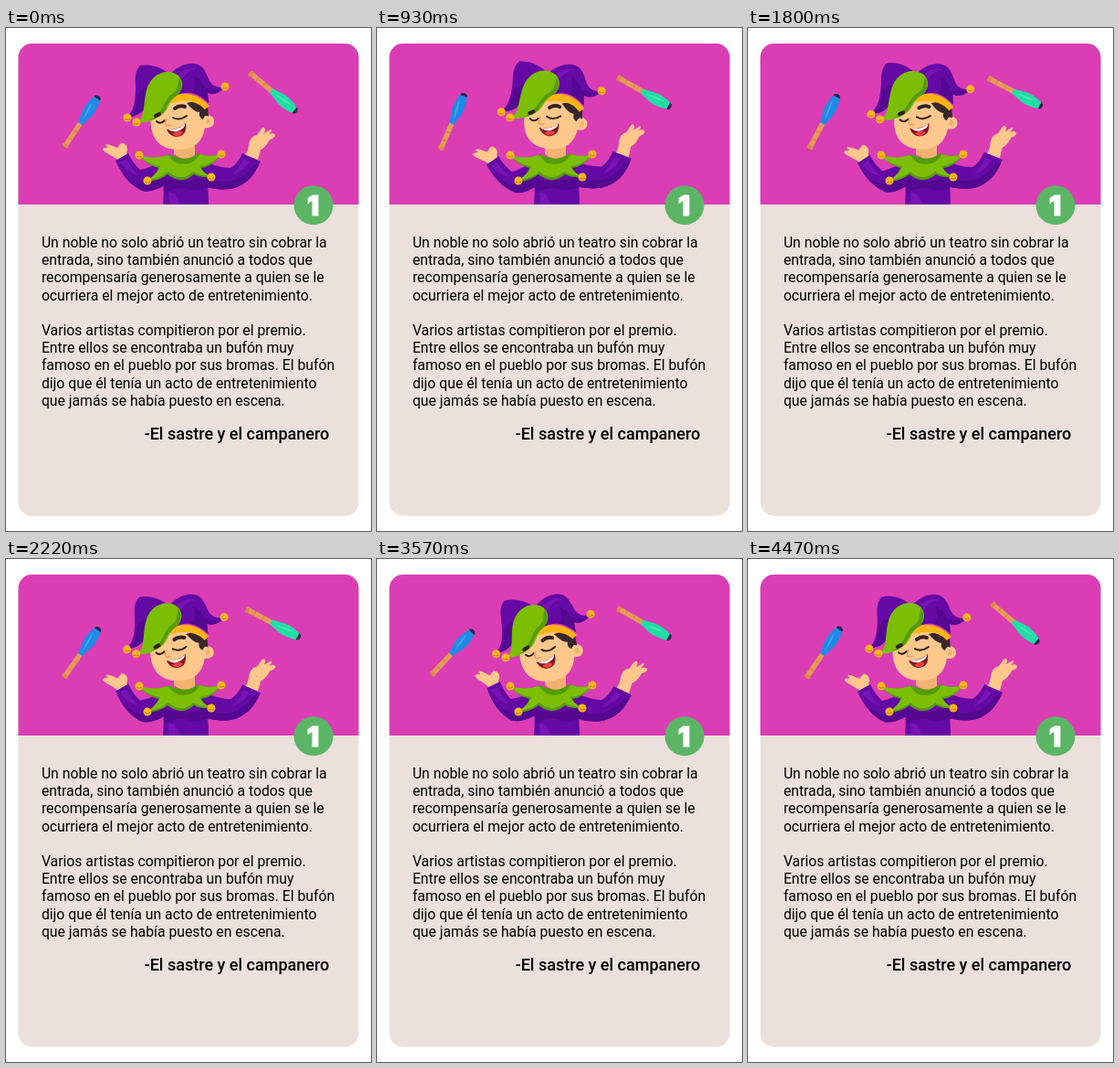
Write an HTML page that moves like this. It is 400 px wide and 550 px high and loops after 4500 ms.

```html
<!DOCTYPE html>
<html lang="es">
<head>
<meta charset="utf-8">
<style>
  html, body { margin: 0; width: 100%; height: 100%; overflow: hidden; background: #fff }
  svg { display: block; width: 400px; height: 550px }
  text { font-family: Roboto, sans-serif; font-size: 15.75px; fill: #000 }
  .purple { fill: #6409a4 } .deep { fill: #540790 } .violet { fill: #7813b4 }
  .green { fill: #7cbe04 } .moss { fill: #559a0a } .skin { fill: #fec88c } .shade { fill: #f4b172 }
  .line { fill: none; stroke: #33201f; stroke-width: 2; stroke-linecap: round }
</style>
</head>
<body>
<svg viewBox="0 0 400 550">
  <defs>
    <clipPath id="card"><rect x="13.5" y="17" width="373" height="516.5" rx="15"/></clipPath>
    <clipPath id="scene"><path d="M13 17H387V193H13Z"/></clipPath>
    <g id="bell">
      <circle r="4.5" fill="#f8b51e"/>
      <path d="M-3 1.5Q0 2.5 3 1.5" fill="none" stroke="#c87d12"/>
    </g>
    <g id="club">
      <path d="M-32-2.8L0-2.8V2.8L-32 2.8Z" fill="#e59b58"/>
      <rect x="-34" y="-3.6" width="4" height="7.2" rx="1.8" fill="#d98a48"/>
      <path d="M-23-2.8V2.8M-13-2.8V2.8" stroke="#cf8344"/>
      <path d="M-3-3C6-4 9-6.5 17-6.3Q25-6 32-3.3V3.3Q25 6 17 6.3C9 6.5 6 4-3 3Z"/>
      <path d="M2 0C9-1 14-3 24-2.6Q16 1 2 0Z" fill="#fff" opacity=".2"/>
      <path d="M30-4L32-3.4Q35 0 32 3.4L30 4Z" fill="#26264e"/>
    </g>
  </defs>

  <g clip-path="url(#card)">
    <path d="M0 0H400V550H0Z" fill="#ebe0db"/>
    <path d="M0 0H400V193H0Z" fill="#db3db5"/>
  </g>

  <g clip-path="url(#scene)">
    <use id="blueClub" href="#club" fill="#1e8ce6"/>
    <use id="tealClub" href="#club" fill="#20dfa4"/>

    <g id="leftArm">
      <path class="skin" d="M122 144C117 139 110 138 106 133Q106 130 112 131L109 128Q111 126 117 129L122 131L126 126Q130 125 132 129Q134 132 132 136L134 141Z"/>
      <path class="purple" d="M120 145L134 137Q139 148 147 155Q158 153 172 145L177 170Q160 181 149 178C136 172 127 161 120 145Z"/>
      <path class="deep" d="M128 158Q140 170 152 170Q163 169 175 160L177 170Q160 181 149 178Q136 172 128 158Z"/>
      <path class="violet" d="M125 147L132 143Q138 154 145 161Q132 157 125 147Z"/>
    </g>
    <g id="rightArm">
      <path class="skin" d="M262 139C267 133 265 127 268 122Q270 118 275 117L280 110Q283 107 284 111L283 115L290 111Q292 111 290 114L288 116Q294 114 295 117Q295 120 289 122C286 128 283 131 279 133L276 144Z"/>
      <path class="purple" d="M259 137L279 146Q272 162 262 169C249 179 232 178 213 172L215 145Q233 153 246 153Q254 148 259 137Z"/>
      <path class="deep" d="M214 163Q231 170 249 167Q264 161 272 149L277 150Q270 164 262 169C249 179 232 178 213 172Z"/>
      <path class="violet" d="M260 143L267 146Q260 157 247 161Q256 153 260 143Z"/>
    </g>

    <path class="purple" d="M170 145H216Q222 163 222 194H172Q174 170 170 145Z"/>
    <path class="deep" d="M173 163Q197 173 220 161L221 174Q208 180 196 175Q181 174 174 181Z"/>
    <path class="violet" d="M178 180Q187 178 191 194H179Z"/>
    <path class="moss" d="M146 139Q162 145 179 138Q195 148 211 137Q221 142 236 138Q226 152 214 153Q217 160 225 163Q214 164 206 160Q198 167 190 166Q183 165 177 160Q167 168 155 167Q165 160 167 153Q154 150 146 139Z"/>
    <path class="green" d="M146 139Q162 144 177 139Q195 151 213 138Q222 142 236 138Q226 150 212 151Q215 158 224 162Q210 161 205 157Q198 164 190 163Q183 162 178 157Q168 165 156 166Q167 158 169 151Q154 149 146 139Z"/>
    <path class="moss" d="M178 139Q194 145 212 138Q207 149 195 149Q183 149 178 139Z"/>
    <path class="shade" d="M184 123H207V139Q195 147 184 138Z"/>
    <use href="#bell" x="146" y="139"/><use href="#bell" x="155" y="167"/>
    <use href="#bell" x="225" y="163"/><use href="#bell" x="236" y="138"/>

    <g id="head">
      <path class="purple" d="M181 52C170 42 158 39 147 41C140 48 142 58 142 66C142 80 140 90 133 97Q144 98 152 88L175 76Z"/>
      <path class="deep" d="M144 73Q150 64 156 66L152 88Q146 96 138 96Q144 87 144 73Z"/>
      <path class="skin" d="M159 92Q170 74 194 75Q216 77 221 95Q229 96 228 104Q226 110 218 109Q214 133 189 133C167 133 156 119 159 92Z"/>
      <path class="shade" d="M220 99Q226 99 224 104Q222 107 219 105Z"/>
      <path d="M198 82Q212 77 221 86L222 97Q218 94 216 100Q211 98 212 92Q206 92 198 82Z" fill="#38282c"/>
      <path d="M176 76Q204 64 223 85L218 89Q206 76 182 82Z" fill="#ffb414"/>
      <path class="purple" d="M179 52C188 40 206 34 215 43C224 53 220 66 240 65Q231 75 221 71L222 82Q205 63 182 76Z"/>
      <path class="deep" d="M206 52Q215 57 218 65Q224 70 236 66Q229 75 221 71L222 82Q214 74 204 71Q211 64 206 52Z"/>
      <path class="violet" d="M188 51Q200 40 209 45Q199 46 192 57Z"/>
      <path class="green" d="M144 103C153 97 150 83 154 68C158 52 173 44 186 50C196 56 195 68 187 74C177 81 180 90 168 97Q155 105 144 103Z"/>
      <path class="moss" d="M190 54C187 63 190 67 181 73C172 80 174 91 158 101Q171 98 175 88Q178 80 187 74Q196 66 190 54Z"/>
      <path class="line" d="M165 102Q169 106 174 101M183 98Q190 102 198 96"/>
      <path class="line" style="stroke-width:4" d="M185 88Q190 84 196 86M164 96L168 94"/>
      <path d="M176 99Q173 106 177 107L181 106" fill="none" stroke="#e59a62" stroke-width="1.5"/>
      <path d="M176 111Q188 112 197 104Q199 118 187 119Q180 119 176 111Z" fill="#851524"/>
      <path d="M178 111Q188 112 196 105Q197 109 188 113Q182 114 178 111Z" fill="#fff"/>
      <path d="M182 116Q188 111 194 114Q191 119 186 118Z" fill="#ef4040"/>
      <use href="#bell" x="133" y="98"/><use href="#bell" x="143" y="103"/><use href="#bell" x="240" y="64"/>
    </g>
  </g>

  <circle cx="337" cy="193.7" r="21.5" fill="#5bb565"/>
  <text x="336.5" y="205" text-anchor="middle" style="font:900 30px Inter,sans-serif;fill:#fff;stroke:#fff">1</text>
  <g id="story"></g>
  <text x="253" y="450" text-anchor="middle" style="font-size:18px;font-weight:500">-El sastre y el campanero</text>
</svg>

<script>
const LOOP = 4500;
const lines = [
  'Un noble no solo abrió un teatro sin cobrar la',
  'entrada, sino también anunció a todos que',
  'recompensaría generosamente a quien se le',
  'ocurriera el mejor acto de entretenimiento.',
  '',
  'Varios artistas compitieron por el premio.',
  'Entre ellos se encontraba un bufón muy',
  'famoso en el pueblo por sus bromas. El bufón',
  'dijo que él tenía un acto de entretenimiento',
  'que jamás se había puesto en escena.'
];
const $ = id => document.getElementById(id);
$('story').innerHTML = lines
  .map((line, i) => `<text x="38.9" y="${240 + i * 19.2}">${line}</text>`).join('');

// Keys are [ms, value]
const swayKeys = [[0, 0], [600, .7], [1250, 1.08], [1350, 1.07], [2220, -.13],
  [2820, -.85], [3195, -.97], [3570, -.85], [4500, 0]];
const tealKeys = [[0, 40], [600, 31], [1350, 28.3], [1650, 28], [3250, 28], [3570, 29.5], [4500, 40]];

// Smooth periodic curve through the keys, without overshoot
function curve(keys, t) {
  const n = keys.length - 1;
  const slope = i => {
    const [a, b] = [keys[(i + n) % n], keys[(i + n) % n + 1]];
    return (b[1] - a[1]) / (b[0] - a[0]);
  };
  const tangent = i => {
    const p = slope(i - 1), q = slope(i);
    return p * q > 0 ? 2 * p * q / (p + q) : 0;
  };
  const i = keys.findIndex((k, j) => j < n && t < keys[j + 1][0]);
  const [t0, v0] = keys[i], [t1, v1] = keys[i + 1];
  const d = t1 - t0, u = (t - t0) / d, w = 1 - u;
  return v0 * w * w * (1 + 2 * u) + v1 * u * u * (3 - 2 * u)
    + d * u * w * (w * tangent(i) - u * tangent(i + 1));
}

const turn = (id, angle, x, y) => $(id).setAttribute('transform', `rotate(${angle} ${x} ${y})`);
const place = (id, x, y, angle) => $(id).setAttribute('transform', `translate(${x} ${y}) rotate(${angle})`);

function draw() {
  const t = performance.now() % LOOP;
  const sway = curve(swayKeys, t);
  turn('head', 6 * sway, 196, 128);
  turn('leftArm', -5.2 * sway, 172, 147);
  turn('rightArm', -3 * sway, 215, 147);
  place('blueClub', 83, 102, -56 - 11 * sway);
  place('tealClub', 293, 70.5, curve(tealKeys, t));
  requestAnimationFrame(draw);
}
draw();
</script>
</body>
</html>
```
